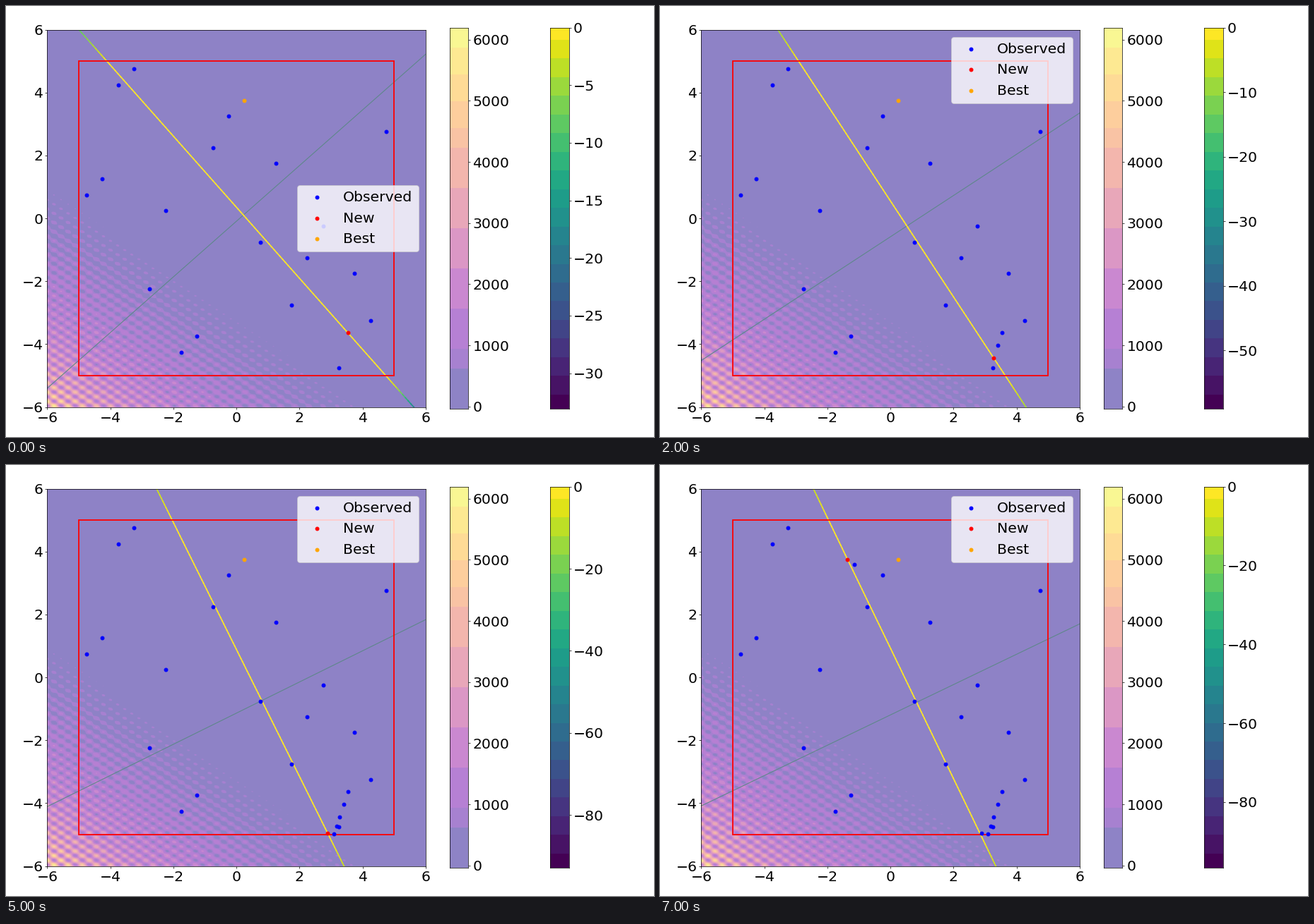
Write a matplotlib script that moves like this. It is 917 by 611 pixels and loops after 8000 ms.

```python
import numpy as np
import matplotlib.pyplot as plt
from matplotlib.animation import FuncAnimation
from matplotlib.collections import LineCollection
from matplotlib.patches import Rectangle
from matplotlib.ticker import MaxNLocator

W, H, DPI = 917, 611, 64
PX = 72 / DPI          # points per pixel
FONT = 20.4 * PX
LIM = 6

plt.rcParams.update({"font.family": "DejaVu Sans", "font.size": FONT,
                     "axes.linewidth": 0.7 * PX})
for tick in ("xtick.major.", "ytick.major."):
    plt.rcParams.update({tick + "width": 0.7 * PX,
                         tick + "size": 3 * PX, tick + "pad": 3 * PX})

# Latin square design: one sample per row, this is the column of each
COLUMNS = [3, 2, 10, 9, 19, 8, 12, 1, 0, 5, 15, 11, 14, 17, 4, 13, 18, 7, 6, 16]
BEST = 2
DESIGN = np.column_stack([np.array(COLUMNS) / 2 - 4.75,
                          4.75 - np.arange(20) / 2])

# Steepness of the search line and height of the new point, per step
SLOPES = np.array([1.13, 1.316, 1.525, 1.694, 1.86, 2.019, 2.23, 2.074])
NEW_Y = np.array([-3.64, -4.03, -4.43, -4.73, -4.97, -4.95, 3.59, 3.75])

# Everything else about a step follows from how far the line has turned
TURN = SLOPES - SLOPES[0]
SEARCH_AT_0 = 0.355 + 0.43 * TURN + 0.19 * TURN ** 2
NORMAL_AT_0 = -0.09 - 1.31 * TURN + 0.15 * TURN ** 2
DEPTH = 33.07 + 64.5 * TURN + 3 * TURN ** 2
NEW = np.column_stack([(SEARCH_AT_0 - NEW_Y) / SLOPES, NEW_Y])

F_MIN, F_MAX = -34, 6197
# Objective bands: 19 equal levels, some of them merged
EDGES = np.r_[0, 2, 3:15:2, 14:18:4j, 19] / 19
TONES = (EDGES[:-1] + EDGES[1:]) / 2
TONES[0] /= 2
BANDS = 0.5 + 0.5 * plt.cm.plasma(TONES)[:, :3]


def objective(x, y):
    growth = 217 * np.exp(-0.329 * (0.7 * x + y))
    px, py = (x + LIM) * 44.6, (LIM - y) * 44.6
    falling = np.sin(np.pi * (px / 20 - py / 13)) ** 2
    rising = np.sin(np.pi * (px / 20 + py / 13)) ** 2
    return growth * (0.2 + 0.5 * falling + 0.3 * rising)


def landscape(n=535, over=3):
    c = (np.arange(n * over) + 0.5) / (n * over) * 2 * LIM - LIM
    x, y = np.meshgrid(c, -c)
    level = (objective(x, y) - F_MIN) / (F_MAX - F_MIN)
    rgb = BANDS[np.digitize(level, EDGES[1:-1])]
    return rgb.reshape(n, over, n, over, 3).mean(axis=(1, 3))


def penalty(x, y):
    return (-8 * np.clip(np.abs(y) - 5, 0, None)
            - 17 * np.clip(np.abs(x) - 5, 0, None))


def add_axes(left, top, right, bottom):
    return fig.add_axes([left / W, 1 - bottom / H,
                         (right - left) / W, (bottom - top) / H])


def color_axes(left, right, edges, colors):
    ax = add_axes(left, 30.6, right, 570.8)
    ax.pcolormesh([0, 1], edges, colors[:, None, :3], transform=ax.transAxes)
    ax.set_xticks([])
    ax.yaxis.tick_right()
    return ax


def dots(points, color, label, z):
    return ax.scatter(*np.transpose(points), s=(4.9 * PX) ** 2, c=color,
                      linewidths=PX, label=label, zorder=z)


fig = plt.figure(figsize=(W / DPI, H / DPI), dpi=DPI, facecolor="white")

ax = add_axes(58.4, 33.6, 593.8, 568.6)
ax.set_facecolor(BANDS[0])
ax.imshow(landscape(), extent=(-LIM, LIM, -LIM, LIM), aspect="auto")
ax.set(xlim=(-LIM, LIM), ylim=(-LIM, LIM),
       xticks=range(-6, 7, 2), yticks=range(-6, 7, 2))

normal, = ax.plot([], [], color=(0.37, 0.53, 0.54), lw=1.1 * PX, zorder=1.1)
search = LineCollection([], cmap="viridis", linewidths=1.7 * PX,
                        capstyle="projecting", zorder=1.2)
ax.add_collection(search, autolim=False)
ax.add_patch(Rectangle((-5, -5), 10, 10, fill=False, ec="red",
                       lw=1.8 * PX, zorder=1.3))

start = np.delete(DESIGN, BEST, axis=0)
seen = dots(start, "blue", "Observed", 2)
new = dots(NEW[:1], "red", "New", 2.1)
dots(DESIGN[[BEST]], "orange", "Best", 2.2)
legend = ax.legend(loc="center right", handleheight=0.83)
legend.get_frame().set_linewidth(0.85 * PX)

f_ax = color_axes(627.6, 654.4, EDGES, BANDS)
f_ax.set(ylim=(F_MIN, F_MAX), yticks=range(0, 6001, 1000))

q_edges = np.r_[0, 0.037:0.968:20j, 1]
q_ax = color_axes(769.8, 796.6, q_edges, plt.cm.viridis(np.linspace(0, 1, 21)))
q_ax.yaxis.set_major_locator(MaxNLocator(9, steps=[1, 2, 2.5, 5, 10]))


def update(i):
    seen.set_offsets(np.vstack([start, NEW[:i]]))
    new.set_offsets(NEW[i:i + 1])

    y = np.linspace(6.1, -6.1, 123)
    x = (SEARCH_AT_0[i] - y) / SLOPES[i]
    line = np.column_stack([x, y])
    search.set_segments(np.stack([line[:-1], line[1:]], axis=1))
    search.set_array(penalty(x[:-1], y[:-1]))
    search.set_clim(-DEPTH[i], 0)

    ends = np.array([-LIM, LIM])
    normal.set_data(ends, NORMAL_AT_0[i] + ends / SLOPES[i])

    legend.set_loc("center right" if i < 2 else "upper right")
    q_ax.set_ylim(-DEPTH[i], 0)
    return seen, new, search, normal


anim = FuncAnimation(fig, update, frames=len(SLOPES), interval=1000,
                     init_func=lambda: update(0), repeat=True, repeat_delay=0)
plt.show()
```
